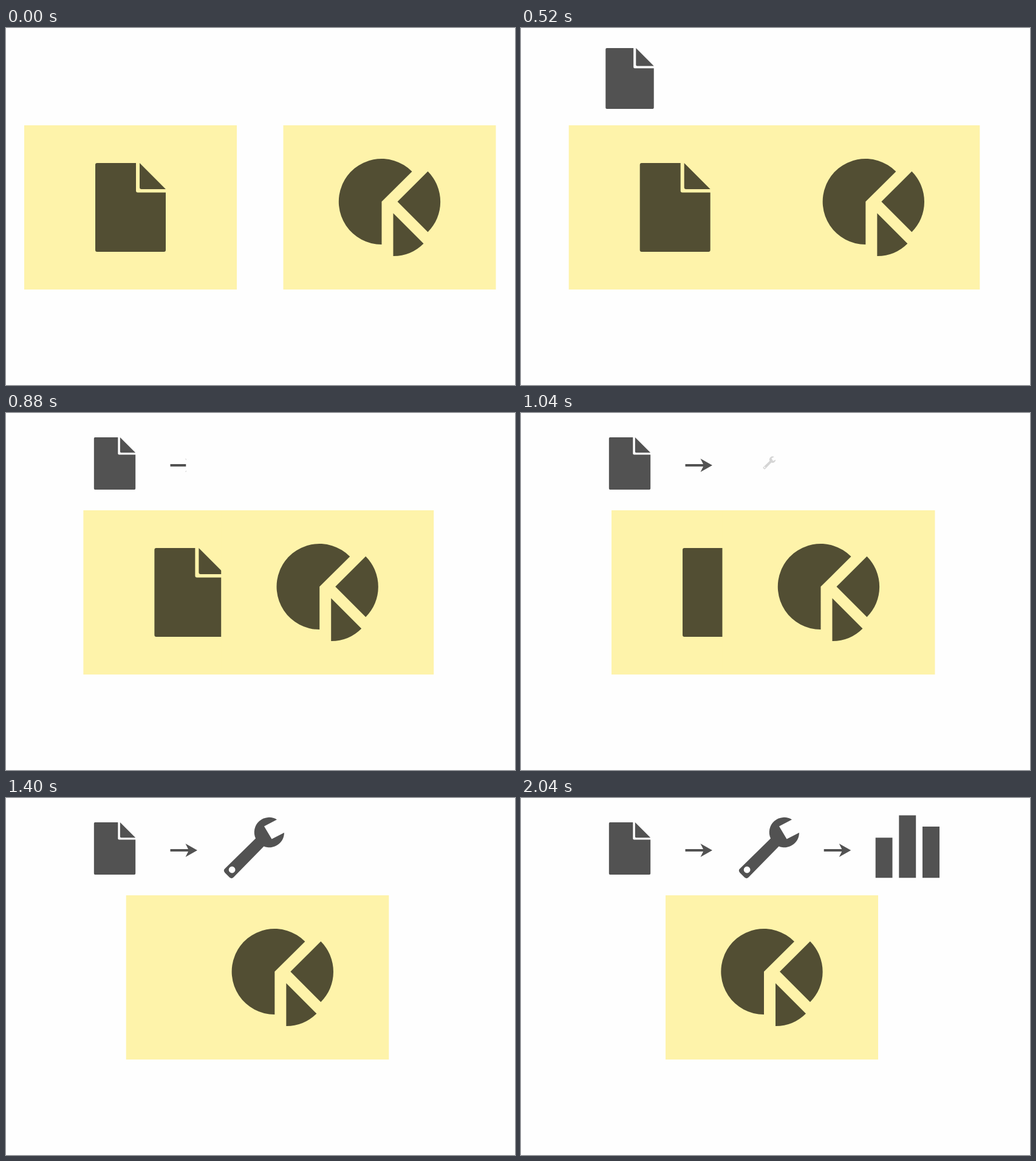
Write an HTML page that moves like this. It is 838x587 px and loops after 2080 ms.

```html
<!DOCTYPE html>
<html lang="en">
<head>
<meta charset="utf-8">
<title>Cards and steps</title>
<style>
html, body { margin: 0; width: 100%; height: 100%; overflow: hidden; background: #fefefe; }
svg { display: block; width: 838px; height: 587px; }
.card { fill: #fef3aa; }
.dark { fill: #524e33; }
.step { fill: #525252; }
</style>
</head>
<body>
<svg viewBox="0 0 838 587">
  <defs>
    <path id="file" d="M-55-73H9V-27.5Q9-24.5 12-24.5H58V70Q58 73 55 73H-55Q-58 73-58 70V-70Q-58-73-55-73ZM15-73L58-30H18Q15-30 15-33Z"/>
    <path id="arrow" d="M0-2H29.5L25-11L44.5 0L25 11L29.5 2H0Z"/>
    <clipPath id="wipe1"><rect x="270" y="70" height="32"/></clipPath>
    <clipPath id="wipe2"><rect x="498" y="70" height="32"/></clipPath>
  </defs>

  <g id="left">
    <rect class="card" width="350" height="270"/>
    <use class="dark" href="#file" x="175" y="135"/>
  </g>
  <g id="right">
    <rect class="card" width="350" height="270"/>
    <path class="dark" d="M162 125.5V196A70.5 70.5 0 1 1 212 76ZM188 125.5L238 75.8A70.5 70.5 0 0 1 238 175.5ZM181 144.5L231 194.5A70.5 70.5 0 0 1 181 215Z"/>
  </g>

  <g class="step">
    <g id="page"><use href="#file" transform="translate(179 83) scale(.589)"/></g>
    <g clip-path="url(#wipe1)"><use href="#arrow" x="270.5" y="86"/></g>
    <path id="wrench" fill-rule="evenodd" d="M446 35.5L425 46.5L437.5 67.5L458 57A24.4 24.4 0 0 1 424.5 79.5L375 130Q371.5 133.5 368 130.5L360.5 123Q357 119 360.5 116L411 66.5A24.4 24.4 0 0 1 446 35.5ZM366.7 118a5.4 5.4 0 1 0 10.8 0a5.4 5.4 0 1 0-10.8 0Z"/>
    <g clip-path="url(#wipe2)"><use href="#arrow" x="498.7" y="86"/></g>
    <path id="bars" d="M583.7 65.2H611.5V131.2H583.7ZM622.3 28.6H650.2V131.2H622.3ZM661 47H689V131.2H661Z"/>
  </g>
</svg>
<script>
const LOOP = 2080, TICK = 40, POP = 340;
const el = id => document.getElementById(id);
const progress = (t, start, length) => Math.min(1, Math.max(0, (t - start) / length));

function slide(id, from, p) {
  el(id).setAttribute('transform', `translate(${from + (238 - from) * p} 160)`);
}

// Grows from nothing, overshoots and settles at full size.
function pop(id, x, y, p) {
  const scale = 1 - Math.exp(-2 * p) * (1 - p) * Math.cos(5.8 * p);
  el(id).setAttribute('transform', `translate(${x} ${y}) scale(${scale}) translate(${-x} ${-y})`);
  el(id).setAttribute('opacity', Math.min(1, p * 4));
}

function wipe(id, p) {
  el(id).firstElementChild.setAttribute('width', 46 * p);
}

function draw(t) {
  const move = progress(t, 160, 1538);
  slide('left', 30, move);
  slide('right', 456.5, move);
  pop('page', 179, 83, progress(t, 340, POP));
  wipe('wipe1', progress(t, 720, 280));
  pop('wrench', 409, 82, progress(t, 1020, POP));
  wipe('wipe2', progress(t, 1400, 280));
  pop('bars', 636.5, 80, progress(t, 1700, POP));
}

const begin = performance.now();
function frame() {
  const t = (performance.now() - begin) % LOOP;
  draw(Math.floor(t / TICK) * TICK);
  requestAnimationFrame(frame);
}
frame();
</script>
</body>
</html>
```
